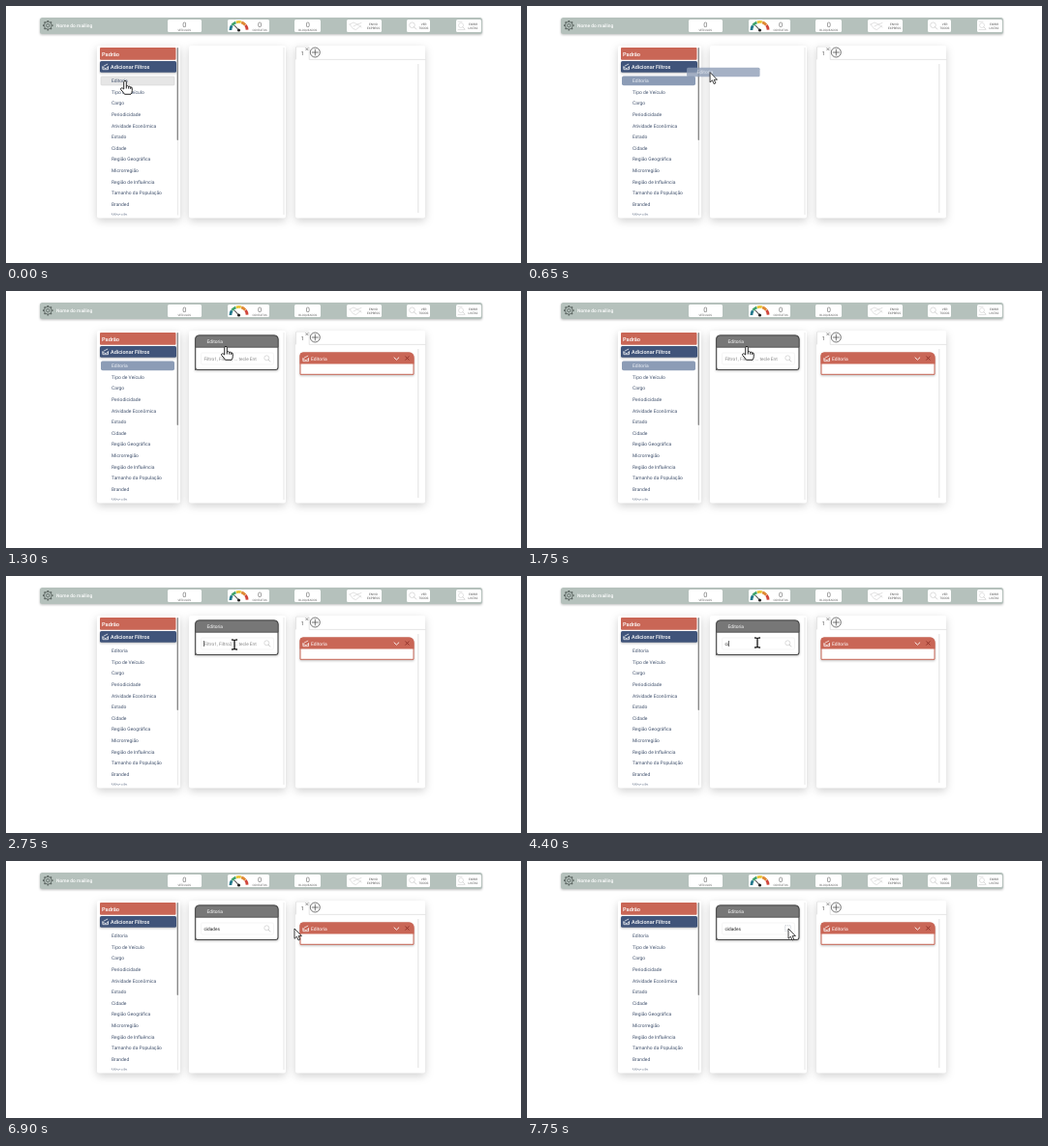
Animation of 532 by 266 pixels, one loop 8 s. Source, as an HTML page:

```html
<!DOCTYPE html>
<html lang="pt">
<head>
<meta charset="utf-8">
<style>
  html, body { margin: 0; width: 100%; height: 100%; overflow: hidden; background: #fff; }
  svg { display: block; width: 100vw; height: 100vh; font-family: Roboto, sans-serif; text-rendering: geometricPrecision; }
  .panel { fill: #fff; filter: drop-shadow(0 3px 4px #0000002e); }
  .soft { filter: drop-shadow(0 1px 1px #00000040); }
  .line { fill: none; stroke-linecap: round; stroke-linejoin: round; }
  .cur { fill: #fff; stroke: #111; stroke-linejoin: round; }
</style>
</head>
<body>
<svg id="stage" viewBox="0 0 532 266"></svg>
<script>
const LOOP = 8000;
const GRAB = 200, DROP = 1050, BLUR = 2500, FOCUS = 2650, PRESS = 7480;
const WORD = 'cidades';
const KEYS = [4250, 4350, 4800, 5000, 5350, 5550, 5850];
const PATH = [
  [150, 123, 78], [1050, 236, 62], [1300, 227, 58], [2350, 227, 58], [2650, 236, 71],
  [3350, 236, 71], [4050, 238, 69], [6450, 238, 69], [6880, 298, 70], [6950, 298, 70], [7400, 270, 70]
];
const FILTERS = ['Editoria', 'Tipo de Veículo', 'Cargo', 'Periodicidade', 'Atividade Econômica', 'Estado', 'Cidade',
  'Região Geográfica', 'Microrregião', 'Região de Influência', 'Tamanho da População', 'Branded', 'Vínculo'];
const RED = '#c96656', NAVY = '#40547a', BLUE = '#8c9cb6';

const rect = (x, y, w, h, fill, r = 0, more = '') =>
  `<rect x="${x}" y="${y}" width="${w}" height="${h}" rx="${r}" fill="${fill}" ${more}/>`;
const text = (x, y, size, fill, s, more = '') =>
  `<text x="${x}" y="${y}" font-size="${size}" fill="${fill}" ${more}>${s}</text>`;
const line = (d, color, w = 0.6, more = '') =>
  `<path class="line" d="${d}" stroke="${color}" stroke-width="${w}" ${more}/>`;
const ring = (x, y, r, color, w = 0.6) =>
  `<circle cx="${x}" cy="${y}" r="${r}" fill="none" stroke="${color}" stroke-width="${w}"/>`;
const lens = (x, y, r, color) =>
  ring(x, y, r, color) + line(`M${x + r * 0.7} ${y + r * 0.7}l${r * 0.8} ${r * 0.8}`, color, 0.8);
const MID = 'text-anchor="middle"';

function gear(x, y) {
  let teeth = '';
  for (let a = 0; a < 360; a += 45)
    teeth += `<path d="M${x} ${y - 4}v-1.2" stroke="#56605c" stroke-width="1.7" transform="rotate(${a} ${x} ${y})"/>`;
  return teeth + ring(x, y, 3.9, '#56605c', 0.8) + ring(x, y, 1.7, '#56605c', 0.8);
}

function gauge(x, y, r) {
  const at = a => `${x - r * Math.cos(a)} ${y - r * Math.sin(a)}`;
  const colors = ['#23798c', '#3fa36c', '#e8c63c', '#e08a35', '#d0453a'];
  const step = Math.PI / colors.length;
  return colors.map((c, i) =>
    `<path d="M${at(i * step)}A${r} ${r} 0 0 1 ${at((i + 1) * step - 0.05)}" fill="none" stroke="${c}" stroke-width="2.8"/>`
  ).join('') + line(`M${x} ${y}l-4.5 -4.8`, '#222', 1) + `<circle cx="${x}" cy="${y}" r="1.6" fill="#222"/>`;
}

const counter = (x, label) =>
  text(x, 21.6, 7.4, '#777', '0', MID) + text(x, 25.6, 3, '#666', label, MID);
const action = (x, top, bottom) =>
  text(x, 20.3, 3.1, '#555', top, MID) + text(x, 24.2, 3.1, '#555', bottom, MID);
const box = (x, w) => rect(x, 14, w, 13, '#fff', 1.5);
const tray = (x, y) =>
  line(`M${x - 2.8} ${y - 0.5}v3.2h5.6v-3.2M${x - 2.8} ${y + 0.8}h1.6l.6 .8h1.2l.6 -.8h1.6M${x - 1.5} ${y - 1}l3.6 -1.8`, '#fff', 0.7);

function header() {
  return rect(35, 12, 457, 17, '#b5c1bc', 2.5, 'class="soft"') + gear(43.3, 20.2) +
    text(52, 22.1, 4.9, '#fff', 'Nome do mailing', 'font-weight="500"') +
    box(167, 35) + counter(184.3, 'VEÍCULOS') +
    box(229, 43) + gauge(240.5, 25, 8.6) + counter(262, 'CONTATOS') +
    box(298, 27) + counter(311.8, 'BLOQUEADOS') +
    box(352, 36) + line('M355 19l4 -2 4 2 4 -1.5M355 19l3.5 4.5 3 1 5 -4M359 21l4 -2 4 3', '#d5d5d5', 0.7) + action(379.5, 'ENVIO', 'EXPRESS') +
    box(414, 24) + lens(419.5, 19.8, 2.8, '#c8c8c8') + action(431.5, 'VER', 'TODOS') +
    box(465, 26) + lens(470, 20, 2.5, '#d2d2d2') + line('M467 24.5h7M467 16h4', '#d2d2d2') + action(482.5, 'EXIBIR', 'LISTAS');
}

function sidebar() {
  const items = FILTERS.map((s, i) =>
    text(109, 79.2 + i * 11.6, 4.95, '#44546f', s, i ? '' : 'id="first"')).join('');
  return rect(94, 41, 86, 178.5, '#fff', 2, 'class="panel"') +
    rect(97, 43, 78.5, 12.8, RED, 1) + text(99, 51.5, 5.65, '#fff', 'Padrão', 'font-weight="500"') +
    rect(97, 57, 79, 11.8, NAVY, 1.5, 'class="soft"') + tray(102.7, 63) +
    text(108, 64.9, 5.5, '#fff', 'Adicionar Filtros', 'font-weight="500"') +
    rect(176.9, 43, 0.9, 173.5, '#e6e6e6') + rect(176.6, 43, 1.4, 96, '#8a8a8a', 0.7) +
    `<g id="hover">${rect(98, 73, 76, 9, '#e6e6e6', 1, 'stroke="#cfcfcf" stroke-width=".5"')}</g>` +
    rect(98, 72.6, 76, 9.6, BLUE, 1.8, 'id="picked"') +
    `<g clip-path="url(#list)">${items}</g>`;
}

function workspace() {
  return rect(189, 41, 100, 178.5, '#fff', 2, 'class="panel"') + rect(286.6, 43, 0.8, 173, '#e2e2e2') +
    rect(299, 41, 134, 178.5, '#fff', 2, 'class="panel"') +
    line('M299.5 55V43q0 -1 1 -1h11.5q1.200 0 1.200 1V55.400H433', '#d4d4d4') +
    text(306.3, 51.2, 5.6, '#555', '1', MID) + line('M309.800 43.500l2.200 2.200m0 -2.200l-2.200 2.200', '#555') +
    ring(319.3, 48, 5, '#555', 0.8) + line('M316.300 48h6m-3 -3v6', '#555', 0.8) +
    rect(425.4, 60, 0.9, 154, '#dedede');
}

function cards() {
  return `<g id="cards">
    <g class="soft"><path d="M195.700 82V50q0 -4 4 -4H277q4 0 4 4V79q0 2.500 -2.500 2.500H198q-2.300 0 -2.300 -2.500Z" fill="#fff" stroke="#474747" stroke-width="1.100"/></g>
    <path d="M195.700 58.200V50q0 -4 4 -4H277q4 0 4 4V58.200Z" fill="#777" stroke="#474747" stroke-width=".8"/>` +
    text(207.5, 54, 4.9, '#fff', 'Editoria') +
    rect(201.5, 64, 75, 12, '#fff', 1.5, 'stroke="#eee" stroke-width=".6"') +
    `<g id="lens">${lens(269.3, 69.3, 2.5, '#c4c4c4')}</g>` +
    rect(266.5, 66.7, 6, 6, 'none', 0.5, 'id="ring" stroke="#b5bcc6" stroke-width=".7" stroke-dasharray="1 1"') +
    text(204.4, 71.6, 4.75, '#858585', 'Filtro1, Filtro2, ... tecle Ent', 'id="hint"') +
    text(204.4, 71.6, 4.75, '#222', '', 'id="typed"') +
    rect(204.2, 67, 0.6, 6, '#111', 0, 'id="caret"') +
    `<path class="soft" d="M304 75V67q0 -3 3 -3H416q5 0 5 5V86.300H304Z" fill="#fff" stroke="${RED}"/>
     <path d="M303.500 75.600V67q0 -3.400 3.400 -3.400H416q5.500 0 5.500 5.500V75.600Z" fill="${RED}"/>` +
    tray(309.7, 70) + text(315, 71.700, 4.95, '#fff', 'Editoria') +
    line('M401 68.900l2.400 2.300 2.400 -2.300', '#fff', 0.9) +
    line('M412.700 67.800l3.400 3.400m0 -3.400l-3.400 3.400', '#8c2f25', 0.9) + '</g>';
}

function cursors() {
  const beam = 'M-2.500 -5Q0 -5 0 -4V4Q0 5 -2.500 5M2.500 -5Q0 -5 0 -4V4Q0 5 2.500 5';
  return `<g id="ghost" opacity=".78">${rect(-24, -5, 75.5, 9.6, BLUE, 1.5)}${text(-13.5, 1.6, 4.95, '#dfe5ee', 'Editoria')}</g>
    <g id="cursor">
      <path id="hand" class="cur" stroke-width=".9" d="M-1.300 8V.8Q-1.300 -.6 0 -.6T1.300 .8V5Q2.500 4 3.700 5.400Q5 4.700 5.800 6Q7.300 5.600 7.300 7.300V9.500Q7.300 11.500 6 13.300H-.5Q-1.500 11.500 -4.300 8.600Q-5 7.300 -3.800 6.900Q-2.600 6.700 -1.300 8ZM1.300 5v2.500M3.700 5.400v2.300M5.800 6v2"/>
      <g id="stop">${ring(0, 0, 5.3, '#fff', 3.2)}${ring(0, 0, 5.3, '#111', 1.9)}${line('M-3.700 -3.700L3.700 3.700', '#111', 1.9)}</g>
      <path id="arrow" class="cur" stroke-width=".8" d="M0 0V10.300L2.400 8.200 4.100 12 5.800 11.200 4.200 7.600H7.400Z"/>
      <g id="beam">${line(beam, '#fff', 2.4)}${line(beam, '#111', 1.3)}</g>
    </g>`;
}

const stage = document.getElementById('stage');
stage.innerHTML = '<defs><clipPath id="list"><rect x="94" y="70" width="82" height="146.500"/></clipPath></defs>' +
  header() + sidebar() + workspace() + cards() + cursors();

const el = {};
stage.querySelectorAll('[id]').forEach(n => el[n.id] = n);
const show = (id, on) => el[id].style.display = on ? '' : 'none';

function pointer(t) {
  const i = PATH.findIndex(p => p[0] > t);
  if (i === 0) return PATH[0].slice(1);
  if (i < 0) return PATH[PATH.length - 1].slice(1);
  const [t0, x0, y0] = PATH[i - 1], [t1, x1, y1] = PATH[i];
  const u = (t - t0) / (t1 - t0), s = u * u * (3 - 2 * u);
  return [x0 + (x1 - x0) * s, y0 + (y1 - y0) * s];
}

function shape(t, x, y) {
  if (t < GRAB) return 'hand';
  if (t < DROP) return x < 189 ? 'stop' : 'arrow';
  if (y < 63) return 'hand';
  return x < 264 ? 'beam' : 'arrow';
}

function draw(t) {
  const [x, y] = pointer(t), move = `translate(${x} ${y})`;
  const dragging = t >= GRAB && t < DROP, picked = t >= GRAB && t < BLUR;
  const kind = shape(t, x, y);
  ['hand', 'stop', 'arrow', 'beam'].forEach(k => show(k, k === kind));
  el.cursor.setAttribute('transform', move);
  el.ghost.setAttribute('transform', move);
  show('ghost', dragging);
  show('hover', t < GRAB);
  show('picked', picked);
  el.first.setAttribute('fill', picked ? '#eef1f6' : '#44546f');
  show('cards', t >= DROP);

  const n = KEYS.filter(k => k <= t).length;
  const last = n ? KEYS[n - 1] : FOCUS;
  el.typed.textContent = WORD.slice(0, n);
  show('hint', !n);
  show('caret', t >= FOCUS && (t - last) % 1060 < 530);
  el.caret.setAttribute('x', 204.2 + (n ? el.typed.getComputedTextLength() + 0.2 : 0));
  el.lens.style.opacity = t < PRESS ? 1 : 0.25;
  show('ring', t >= PRESS);
}

const start = performance.now();
function tick() {
  draw((performance.now() - start) % LOOP);
  requestAnimationFrame(tick);
}
tick();
</script>
</body>
</html>
```
